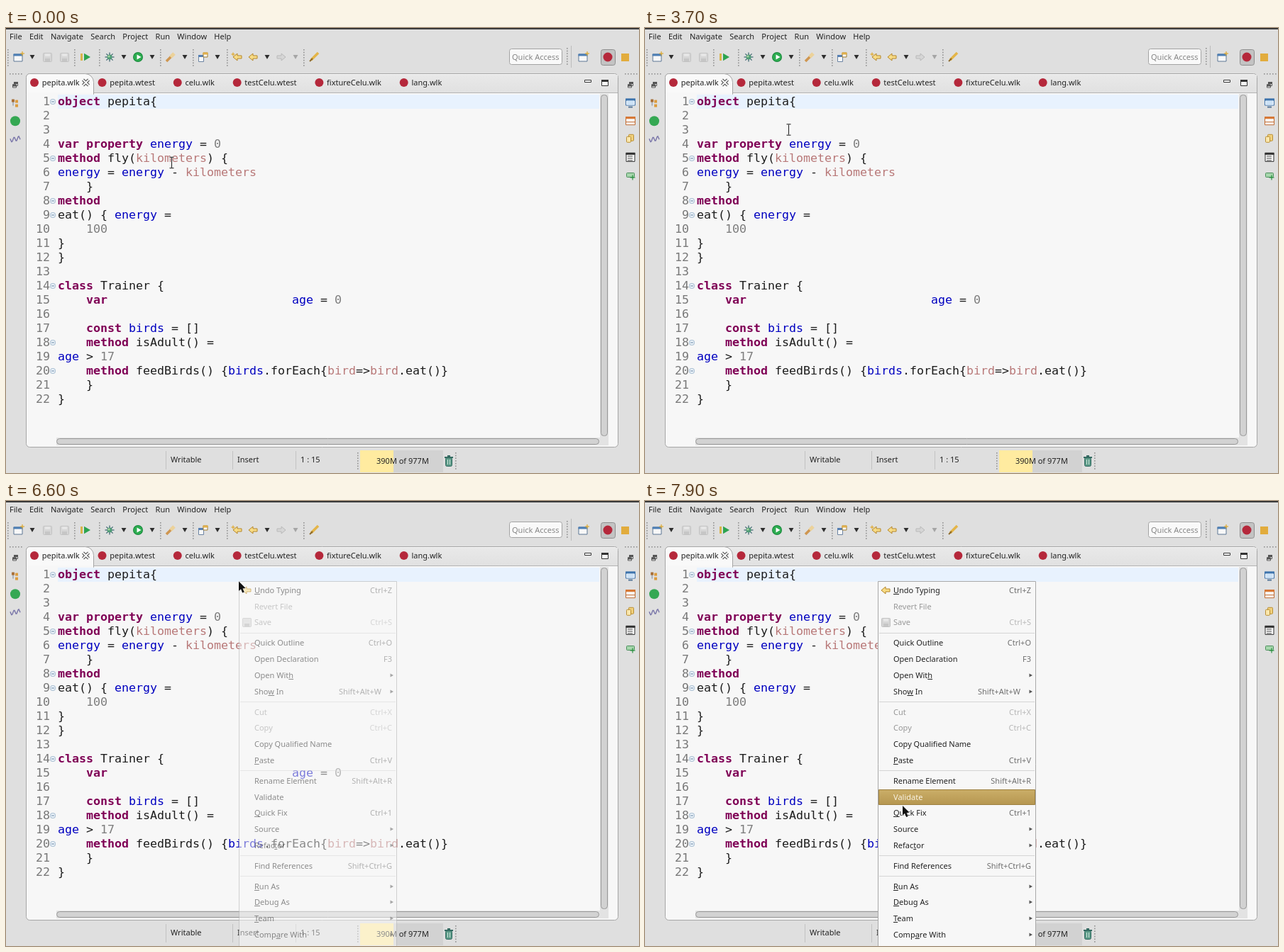
Recreate the animation shown at these times as an HTML page with a canvas. Size 892 px wide and 628 px high, loop 8000 ms.

```html
<!DOCTYPE html>
<html lang="en">
<head>
<meta charset="utf-8">
<title>Editor context menu</title>
<style>
html, body { margin: 0; width: 100%; height: 100%; overflow: hidden; background: #dfdfdf; }
canvas { display: block; }
</style>
</head>
<body>
<canvas id="stage" width="892" height="628"></canvas>
<script>
const W = 892, H = 628, LOOP = 8000, STEP = 100;
const UI = '11px "Noto Sans", "Open Sans", sans-serif';
const MONO = '16.61px "DejaVu Sans Mono", monospace';
const INK = '#222', RED = '#b5283b';
const screen = document.getElementById('stage').getContext('2d');
let g = screen;

// Drawing helpers
function rect(x, y, w, h, color) {
  g.fillStyle = color;
  g.fillRect(x, y, w, h);
}
function paint(fill, stroke, width = 1) {
  if (fill) { g.fillStyle = fill; g.fill(); }
  if (stroke) { g.strokeStyle = stroke; g.lineWidth = width; g.stroke(); }
}
function box(x, y, w, h, r, fill, stroke) {
  g.beginPath();
  g.roundRect(x + .5, y + .5, w - 1, h - 1, r);
  paint(fill, stroke);
}
function poly(x, y, pts, fill, stroke) {
  g.beginPath();
  for (const [dx, dy] of pts) g.lineTo(x + dx, y + dy);
  g.closePath();
  paint(fill, stroke);
}
function line(x0, y0, x1, y1, color, width = 1) {
  g.beginPath();
  g.moveTo(x0, y0);
  g.lineTo(x1, y1);
  paint(null, color, width);
}
function disc(x, y, r, color) {
  g.beginPath();
  g.arc(x, y, r, 0, 7);
  paint(color);
}
function triangle(x, y, r, turn, color) {
  const pts = [0, 1, 2].map(i => {
    const a = turn + i * Math.PI * 2 / 3;
    return [r * Math.cos(a), r * Math.sin(a)];
  });
  poly(x, y, pts, color);
}
function text(s, x, y, color = INK, align = 'left', font = UI) {
  g.font = font;
  g.textAlign = align;
  g.fillStyle = color;
  g.fillText(s, x, y);
  return g.measureText(s).width;
}
function shade(y0, y1, top, bottom) {
  const s = g.createLinearGradient(0, y0, 0, y1);
  s.addColorStop(0, top);
  s.addColorStop(1, bottom);
  return s;
}
function grip(x, y) {
  for (let i = 0; i < 7; i++) rect(x, y + i * 3.7, 1.6, 1.6, '#929292');
}

// Icons, placed by their centre
function panel(x, y, w, h, bar, edge) {
  box(x - w / 2, y - h / 2, w, h, 0, '#f8f8f8', edge);
  rect(x - w / 2, y - h / 2, w, 3, bar);
}
function star(x, y, r, n, color) {
  for (let i = 0; i < n; i++) {
    const a = i * Math.PI / n, c = r * Math.cos(a), s = r * Math.sin(a);
    line(x - c, y - s, x + c, y + s, color, 1.2);
  }
}
function floppy(x, y) {
  box(x - 6, y - 6, 13, 13, 1, '#d6d6d6', '#c2c2c2');
  rect(x - 3, y - 5, 7, 4, '#e6e6e6');
  rect(x - 3, y + 2, 7, 4, '#c6c6c6');
}
function arrow(x, y, dir, fill, edge) {
  const half = [[-6, 0], [0, -5], [0, -2], [6, -2]];
  const pts = [...half, ...half.slice(1).reverse().map(([a, b]) => [a, -b])];
  poly(x, y, pts.map(([a, b]) => [a * dir, b]), fill, edge);
}
const goldArrow = (x, y) => arrow(x, y, 1, '#f8dc85', '#b5862a');
function restore(x, y) {
  panel(x + 1, y - 1, 6, 6, '#555', '#555');
  panel(x - 1, y + 2, 6, 5, '#555', '#555');
}
function newFile(x, y) {
  panel(x, y + 1, 13, 11, '#4d7fb5', '#5c7694');
  star(x + 6, y - 5, 3, 2, '#e0a92e');
}
function resume(x, y) {
  rect(x - 6, y - 5, 3, 10, '#d9b44a');
  triangle(x + 2, y, 6, 0, '#2ca44f');
}
function bug(x, y) {
  star(x, y, 6.5, 4, '#35606a');
  disc(x, y, 3.5, '#4f9c76');
  disc(x - 1, y - 1, 1.6, '#a9d6a0');
}
function run(x, y) {
  disc(x, y, 7, '#16863a');
  disc(x, y, 6, '#2dac50');
  triangle(x + .5, y, 4, 0, '#fff');
}
function torch(x, y) {
  line(x - 6, y + 6, x + 1, y - 1, '#cf9650', 3.5);
  line(x, y, x + 5, y - 5, '#ecd29a', 5);
}
function project(x, y) {
  panel(x - 3, y + 2, 8, 10, '#557fb3', '#6b83a2');
  panel(x + 3, y - 3, 7, 7, '#e2b04a', '#a07c2f');
}
function lastEdit(x, y) {
  goldArrow(x, y);
  star(x - 6, y - 4, 2.5, 2, '#e0a92e');
}
function pencil(x, y) {
  line(x - 4, y + 4, x + 6, y - 6, '#e4b548', 3.5);
  line(x - 6, y + 6, x - 2, y + 2, '#8d6a2c', 2);
}

// Toolbar entries: "|" starts a group with a grip, "v" adds a drop-down
const TOOLS = [
  [17, newFile, 'v'], [58, floppy], [82, floppy], [111, resume, '|'], [146, bug, '|v'], [186, run, 'v'],
  [232, torch, '|v'], [278, project, '|v'], [326, lastEdit, '|'], [348, goldArrow, 'v'],
  [388, (x, y) => arrow(x, y, -1, '#d6d6d6', '#b9b9b9')], [434, pencil, '|'],
];

function drawToolbar() {
  rect(0, 0, W, H, '#dfdfdf');
  rect(0, 0, W, 2, '#3a3a3a');
  let x = 5;
  for (const name of 'File Edit Navigate Search Project Run Window Help'.split(' ')) {
    x += text(name, x, 16) + 10.3;
  }
  grip(2, 30);
  for (const [x, draw, extra = ''] of TOOLS) {
    draw(x, 41);
    if (extra.includes('|')) grip(x - 15, 30);
    if (extra.includes('v')) triangle(x + 20, 40, 4, Math.PI / 2, '#2e2e2e');
  }
  triangle(408, 40, 4, Math.PI / 2, '#a5a5a5');

  box(709, 29, 75, 23, 3, '#f9f9f9', '#a3a3a3');
  text('Quick Access', 713, 45, '#868686');
  grip(790, 28);
  line(796.5, 25, 796.5, 56, '#bcbcbc');
  newFile(813, 41);
  box(838, 30, 21, 23, 3, '#c3c3c3', '#8f8f8f');
  disc(848, 41, 6.5, RED);
  rect(867, 36, 11, 11, '#e2ac3d');
}

function drawSides() {
  const row = i => 80 + 25.6 * i;
  for (const x of [13, 880]) {
    for (let i = -2; i < 3; i++) rect(x + i * 4, 64, 1.6, 1.6, '#929292');
    restore(x, row(0));
  }
  line(10, row(1) - 5, 10, row(1) + 4, '#7c8a99');
  rect(8, row(1) - 5, 4, 4, '#a9713a');
  for (const dy of [-4, 2]) rect(13, row(1) + dy, 4, 4, '#dc9c3e');
  disc(13, row(2), 7, '#35a853');
  g.beginPath();
  for (let i = -7; i <= 7; i++) g.lineTo(13 + i, row(3) - i * .2 + 3 * Math.sin(i));
  paint(null, '#7874a8', 1.4);

  panel(880, row(1) - 1, 14, 10, '#3e74ad', '#3e74ad');
  rect(875, row(1) - 3, 10, 6, '#cde2f6');
  rect(877, row(1) + 5, 6, 2, '#597798');
  panel(880, row(2), 14, 12, '#d77835', '#c26b30');
  line(873, row(2) + 1.5, 887, row(2) + 1.5, '#c26b30');
  box(877, row(3) - 7, 8, 10, 1, '#f0d07c', '#b98e34');
  box(874, row(3) - 4, 7, 9, 1, '#fbe7ac', '#b98e34');
  panel(880, row(4), 13, 13, '#333', '#333');
  for (let i = 0; i < 3; i++) rect(876, row(4) - 2 + 3 * i, 7, 1, '#444');
  box(874, row(5) - 4, 12, 7, 1, '#a6d6ac', '#4b8d5b');
  star(883, row(5) + 3, 3.5, 2, '#27923e');
}

function drawTabs() {
  box(28, 64, 835, 528, 5, '#f7f7f7', '#a6a6a6');
  rect(29, 66, 833, 25, shade(65, 91, '#e9e9e9', '#e1e1e1'));
  rect(29, 91, 833, 1, '#b3b3b3');
  box(28, 64, 96, 30, [5, 12, 0, 0], '#f9f9f9', '#a6a6a6');
  rect(29, 91, 94, 4, '#f7f7f7');
  let x = 40;
  for (const name of ['pepita.wlk', 'pepita.wtest', 'celu.wlk', 'testCelu.wtest', 'fixtureCelu.wlk', 'lang.wlk']) {
    disc(x, 77, 6, RED);
    x += 10.7;
    x += text(name, x, 81) + 31.8;
  }
  for (const [color, width] of [['#444', 4], ['#fafafa', 2.2]]) {
    for (const s of [-4, 4]) line(108.5, 77 - s, 116.5, 77 + s, color, width);
  }
  box(815, 73, 10, 4, 0, '#fff', '#333');
  panel(844, 77.5, 10, 9, '#333', '#333');
}

const CODE = `object pepita{


var property energy = 0
method fly(kilometers) {
energy = energy - kilometers
    }
method
eat() { energy =
    100
}
}

class Trainer {
    var${' '.repeat(26)}age = 0

    const birds = []
    method isAdult() =
age > 17
    method feedBirds() {birds.forEach{bird=>bird.eat()}
    }
}`.split('\n');

function tokenStyle(word) {
  if (/^(object|var|property|method|class|const)$/.test(word)) return ['#7f0055', 'bold ' + MONO];
  if (/^(energy|age|birds)$/.test(word)) return ['#0000c0', MONO];
  if (/^(kilometers|bird)$/.test(word)) return ['#b87878', MONO];
  if (/^\d/.test(word)) return ['#7d7d7d', MONO];
  return ['#1c1c1c', MONO];
}

function drawCode() {
  rect(73, 94, 763, 20, '#e8f2fe');
  CODE.forEach((row, i) => {
    const y = 109 + 20 * i;
    text(i + 1, 62, y, '#787878', 'right', MONO);
    if (/object|method|class|eat\(\) /.test(row)) {
      disc(66, y - 5, 4, '#a9bfd2');
      disc(66, y - 5, 3, '#edf4fa');
      rect(64, y - 5.5, 4, 1, '#6887a5');
    }
    for (const m of row.matchAll(/\w+|[^\w\s]+/g)) {
      const [color, font] = tokenStyle(m[0]);
      text(m[0], 73 + 10 * m.index, y, color, 'left', font);
    }
  });
  rect(837, 93, 12, 496, '#e3e3e3');
  rect(71, 578, 778, 11, '#e3e3e3');
  box(838, 94, 10, 482, 4, '#d2d2d2', '#989898');
  box(71, 579, 765, 9, 4, '#d2d2d2', '#989898');
}

function drawStatus() {
  for (const [label, x] of [['Writable', 232], ['Insert', 326], ['1 : 15', 415]]) {
    rect(x - 7, 597, 1, 26, '#c2c2c2');
    text(label, x, 613);
  }
  grip(495, 599);
  rect(499, 596, 117, 31, '#d2d2d2');
  rect(499, 596, 47, 31, '#ffeba0');
  text('390M of 977M', 522, 615);
  box(619, 606, 10, 13, 2, '#5b9a87', '#356b62');
  rect(618, 605, 12, 2, '#356b62');
  rect(622, 603, 4, 2, '#356b62');
  for (const x of [622, 625]) rect(x, 609, 1, 7, '#d2e8df');
  grip(633, 599);
}

// Context menu: "_" marks the mnemonic, ">" a submenu, "!" a disabled entry
const GROUPS = [
  ['_Undo Typing|Ctrl+Z', 'Revert File||!', 'Save|Ctrl+S|!'],
  ['Quick Outline|Ctrl+O', 'Open Declaration|F3', 'Open Wit_h||>', 'Sho_w In|Shift+Alt+W|>'],
  ['Cut|Ctrl+X|!', 'Copy|Ctrl+C|!', 'Copy Qualified Name', '_Paste|Ctrl+V'],
  ['Rename Element|Shift+Alt+R', 'Validate', '_Quick Fix|Ctrl+1', 'Source||>', 'Refac_tor||>'],
  ['Find References|Shift+Ctrl+G'],
  ['_Run As||>', '_Debug As||>', '_Team||>', 'Comp_are With||>'],
];
const ITEM = 22.72;

function drawItem(item, y, hover) {
  const [label, keys, flag] = item.split('|');
  const off = flag === '!', sub = flag === '>', active = hover && !off;
  if (active) box(329, y - 11, 221, 22, 0, shade(y - 11, y + 11, '#cbae68', '#b59650'), '#9d8142');
  const color = active ? '#fbf5e6' : off ? '#989898' : INK;
  text(label.replace('_', ''), 350, y + 4, color);
  const cut = label.indexOf('_');
  if (cut >= 0) {
    const x = 350 + g.measureText(label.slice(0, cut)).width;
    rect(x, y + 5, g.measureText(label[cut + 1]).width, 1, color);
  }
  if (keys) text(keys, sub ? 529 : 544, y + 4, active ? color : off ? '#b8b8b8' : '#6f6f6f', 'right');
  if (sub) triangle(543, y, 3, 0, active ? color : '#555');
}

function drawMenu(pointerY) {
  box(328, 113, 223, 520, 0, '#f7f7f7', '#a9a9a9');
  let y = 126;
  GROUPS.forEach((group, i) => {
    if (i) rect(330, Math.round(y - 14.5), 219, 1, '#d5d5d5');
    for (const item of group) {
      // the highlight trails the pointer slightly
      drawItem(item, Math.round(y), Math.abs(pointerY - 4 - y) < ITEM / 2);
      y += ITEM;
    }
    y += 6.3;
  });
  goldArrow(339, 126);
  floppy(339, 171);
}

// Pointer glides: first step, last step, end point
const GLIDES = [
  [0, 0, 233.5, 190], [1000, 1000, 238.5, 191], [1200, 2000, 289.5, 187], [2100, 2400, 222.5, 154],
  [3100, 3100, 222.5, 151], [3600, 3900, 182.5, 136], [5200, 5300, 283.5, 125], [5500, 5800, 328, 113.5],
  [7500, 7600, 328, 209], [7700, 7900, 363, 430],
];

function pointer(t) {
  const i = GLIDES.findLastIndex(glide => glide[0] <= t);
  const [start, end, x, y] = GLIDES[i];
  if (t >= end) return [x, y];
  const p = (Math.floor((t - start) / STEP) + 1) / ((end - start) / STEP + 1);
  if (start === 1200) {
    // one sweep around the code
    const a = .19 + p * 5.77;
    return [257.5 - 102 * Math.sin(a), 354 - 168 * Math.cos(a)];
  }
  const e = p * p * (3 - 2 * p);
  const [, , x0, y0] = GLIDES[i - 1];
  return [x0 + (x - x0) * e, y0 + (y - y0) * e];
}

function drawBeam(x, y) {
  for (const [color, width] of [['rgba(255,255,255,.75)', 2.6], [INK, 1.1]]) {
    line(x, y - 7, x, y + 7, color, width);
    for (const dy of [-7.7, 7.7]) line(x - 3, y + dy, x + 3, y + dy, color, width);
  }
}
function drawArrow(x, y) {
  const shape = [[0, 0], [0, 13.5], [3, 10.8], [5.2, 16], [7.7, 15], [5.5, 10], [9.5, 9.6]];
  poly(x, y, shape, '#111', '#fff');
  poly(x, y, shape, '#111');
}

// The window itself never changes, so it is painted once
const base = document.createElement('canvas');
base.width = W;
base.height = H;
g = base.getContext('2d');
[drawToolbar, drawSides, drawTabs, drawCode, drawStatus].forEach(draw => draw());
g = screen;

function render(t) {
  const [x, y] = pointer(t);
  g.drawImage(base, 0, 0);
  if (t >= 6600) {
    g.globalAlpha = t < 6700 ? .5 : t < 6800 ? .9 : 1;
    drawMenu(t < 7500 ? 0 : y);
    g.globalAlpha = 1;
  }
  (t < 6500 ? drawBeam : drawArrow)(x, y);
}

const began = performance.now();
function tick() {
  render((performance.now() - began) % LOOP);
  requestAnimationFrame(tick);
}
tick();
</script>
</body>
</html>
```
